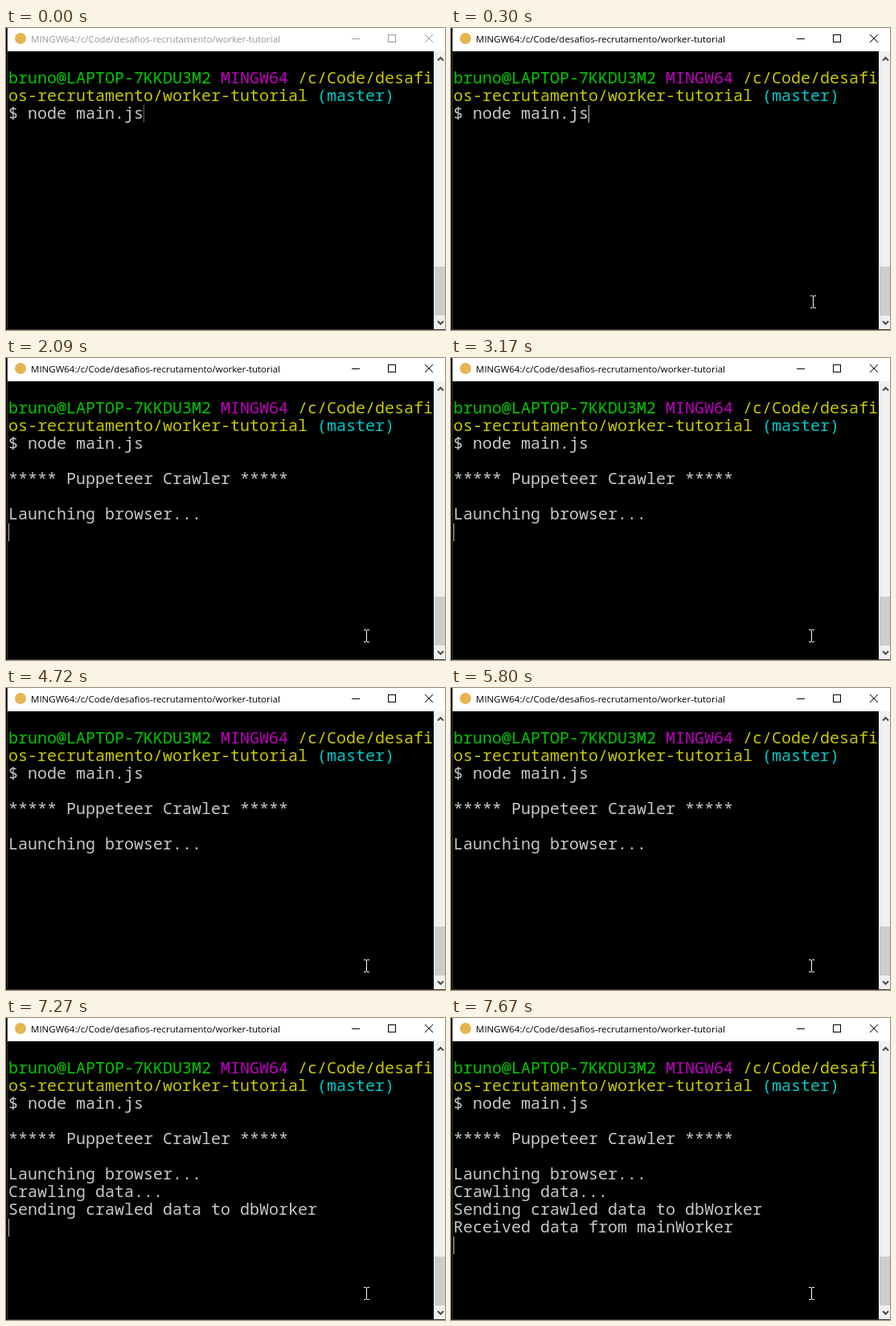
Animation of 546x376 px, one loop 8000 ms. Source, as an HTML page:

```html
<!DOCTYPE html>
<html lang="en">
<head>
<meta charset="utf-8">
<title>Terminal</title>
<style>
  html, body { margin: 0; width: 100%; height: 100%; overflow: hidden; background: #000; }
  .stage { position: relative; width: 546px; height: 376px; overflow: hidden; background: #000; }
  .stage > * { position: absolute; }
  .anim { animation: 8s step-end infinite; }

  .bar { left: 2px; top: 0; width: 544px; height: 29px; background: #fff; animation-name: focus; }
  .title {
    position: absolute; left: 29px; top: 0; white-space: pre;
    font: 11.5px/28px "Open Sans", "Noto Sans", sans-serif; font-variant-ligatures: none;
  }
  .icon { position: absolute; left: 9px; top: 6px; width: 14px; height: 14px; border-radius: 50%; background: #e5b552; }
  .buttons { position: absolute; left: 0; top: 0; }
  .edge { left: 1px; top: 0; width: 1px; height: 376px; background: #333; }
  .foot { left: 1px; top: 375px; width: 545px; height: 1px; background: #333; }

  .text {
    left: 3px; top: 51px; margin: 0; color: #c8c8c8;
    font: 500 20px/22px "Noto Sans Mono", "DejaVu Sans Mono", monospace; font-variant-ligatures: none;
  }
  .host { color: #00c800; }
  .sys { color: #c000c0; }
  .path { color: #c8c800; }
  .branch { color: #00c8c8; }
  .launch { animation-name: launch; }
  .crawl { animation-name: crawl; }
  .receive { animation-name: receive; }

  .caret { left: 3px; top: 52px; width: 1px; height: 22px; background: #c8c8c8; animation-name: caret; }
  .idle { left: 171px; top: 96px; width: 1px; height: 22px; animation-name: idle;
    background: repeating-linear-gradient(#c8c8c8 0 1px, #000 1px 2px); }
  .mouse { left: 445px; top: 332px; animation-name: mouse; }

  @keyframes focus {
    0% { color: #999; }
    .875% { color: #666; }
    1.875% { color: #333; }
    2.875%, 100% { color: #000; }
  }
  @keyframes idle { 0% { opacity: 1; } .875%, 100% { opacity: 0; } }
  @keyframes launch { 0% { opacity: 0; } 13.5%, 100% { opacity: 1; } }
  @keyframes crawl { 0% { opacity: 0; } 90.875%, 100% { opacity: 1; } }
  @keyframes receive { 0% { opacity: 0; } 95.875%, 100% { opacity: 1; } }
  @keyframes caret {
    0% { opacity: 0; transform: translate(168px, 44px); }
    .875% { opacity: 1; transform: translate(168px, 44px); }
    5.625% { opacity: 0; transform: translate(168px, 44px); }
    13.5%, 26.125%, 39.625%, 52.25%, 65.875%, 79.5% { opacity: 1; transform: translateY(154px); }
    19.25%, 32.75%, 46.375%, 59%, 72.5%, 85.125% { opacity: 0; transform: translateY(154px); }
    90.875% { opacity: 1; transform: translateY(198px); }
    95.875%, 100% { opacity: 1; transform: translateY(220px); }
  }
  @keyframes mouse {
    0% { opacity: 0; transform: translate(2px, 1px); }
    2.875% { opacity: 1; transform: translate(2px, 1px); }
    5.625% { opacity: 0; transform: none; }
    11.375% { opacity: 1; transform: none; }
    22.125% { opacity: 1; transform: translateY(6px); }
    85.125% { opacity: 1; transform: translateY(4px); }
    86.125%, 100% { opacity: 1; transform: translateY(3px); }
  }
</style>
</head>
<body>
<div class="stage">
  <div class="bar anim">
    <div class="icon"></div>
    <div class="title">MINGW64:/c/Code/desafios-recrutamento/worker-tutorial</div>
    <svg class="buttons" width="544" height="29" fill="none" stroke="currentColor">
      <path d="M428 13.5h10M473.5 8.5h9v9h-9z" shape-rendering="crispEdges"/>
      <path d="M519 8l10 10m0-10l-10 10"/>
    </svg>
  </div>

  <pre class="text"><span class="host">bruno@LAPTOP-7KKDU3M2</span> <span class="sys">MINGW64</span> <span class="path">/c/Code/desafi
os-recrutamento/worker-tutorial</span> <span class="branch">(master)</span>
$ node main.js
<span class="launch anim">
***** Puppeteer Crawler *****

Launching browser...</span>
<span class="crawl anim">Crawling data...
Sending crawled data to dbWorker</span>
<span class="receive anim">Received data from mainWorker</span></pre>

  <div class="idle anim"></div>
  <div class="caret anim"></div>

  <svg style="left:532px;top:29px" width="14" height="346">
    <path fill="#f0f0f0" d="M0 0h14v346H0z"/>
    <path fill="#cdcdcd" d="M1 268h13v61H1z"/>
    <path fill="none" stroke="#484848" stroke-width="2" d="M5 11.5l3.5-3.5 3.5 3.5M5 336l3.5 3.5 3.5-3.5"/>
  </svg>
  <div class="edge"></div>
  <div class="foot"></div>

  <svg class="mouse anim" width="7" height="16" fill="none" stroke="#fff" shape-rendering="crispEdges">
    <path d="M0 .5h3m1 0h3M3.5 1v14M0 15.5h3m1 0h3"/>
  </svg>
</div>
</body>
</html>
```
